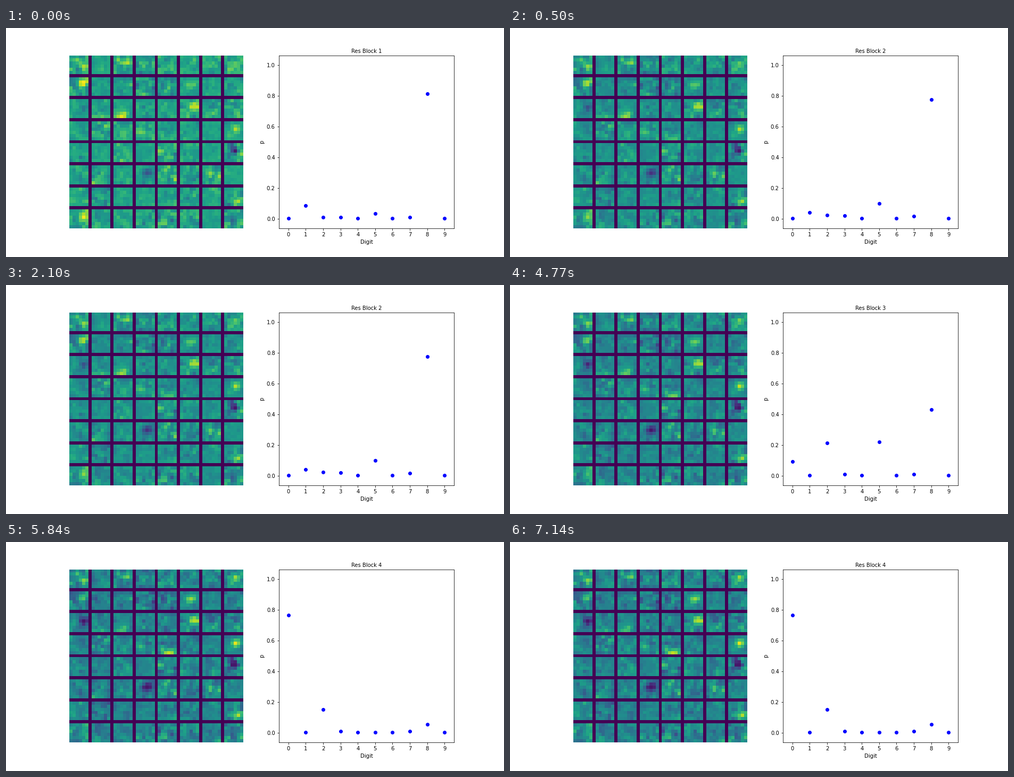
A matplotlib script for the animation above (8000 ms loop, 936 by 432 pixels).

```python
import matplotlib.pyplot as plt
import numpy as np
from matplotlib.animation import FuncAnimation

TILES, SIZE = 8, 6
STEP = SIZE + 1
SIDE = TILES * STEP - 1
INTERVAL, LOOP = 40, 8000
SWITCHES = (500, 3170, 5840)
BLOCKS = len(SWITCHES) + 1

# Digits that stand out in each block; the others stay near zero
PEAKS = (
    {1: .086, 2: .010, 5: .034, 8: .814},
    {1: .041, 2: .024, 3: .020, 5: .100, 7: .017, 8: .776},
    {0: .093, 2: .214, 5: .220, 8: .431},
    {0: .765, 2: .152, 8: .055},
)

# Strongest features: row, column, strength in the first and last block
SPOTS = (
    (3, 4, .28, .33), (2, 52, .22, .40), (8, 4, .33, .10), (9, 38, .20, .38),
    (16, 4, -.12, -.40), (19, 16, .42, .27), (16, 39, .36, .46),
    (26, 31, .02, .45), (23, 52, .28, .46), (30, 52, -.32, -.42),
    (37, 24, -.35, -.42), (46, 53, .22, .38), (51, 4, .36, .05),
)


def noise_tile(rng):
    """Partly smoothed noise around a random tile mean."""
    n = rng.normal(size=(SIZE + 1, SIZE + 1))
    smooth = (n[1:, 1:] + n[:-1, 1:] + n[1:, :-1] + n[:-1, :-1]) / 2
    tile = 0.85 * smooth + 0.4 * rng.normal(size=(SIZE, SIZE))
    return rng.uniform(0.03, 0.11) * tile + rng.normal(0, 0.015)


def noise_map(rng):
    grid = np.zeros((SIDE, SIDE))
    for r in range(0, SIDE, STEP):
        for c in range(0, SIDE, STEP):
            grid[r:r + SIZE, c:c + SIZE] = noise_tile(rng)
    return grid


def spot_map(share):
    rows, cols = np.mgrid[:SIDE, :SIDE]
    grid = np.zeros((SIDE, SIDE))
    for r, c, first, last in SPOTS:
        same_tile = (rows // STEP == r // STEP) & (cols // STEP == c // STEP)
        blob = np.exp(-(rows - r) ** 2 / 1.6 - (cols - c) ** 2 / 2.4)
        grid += (first + share * (last - first)) * blob * same_tile
    return grid


def feature_maps():
    rng = np.random.default_rng(8)
    base, drift = noise_map(rng), noise_map(rng)
    line = np.arange(SIDE) % STEP == SIZE
    gaps = line[:, None] | line[None, :]
    maps = []
    for share in np.linspace(0, 1, BLOCKS):
        level = 0.465 + 0.12 * (1 - share) ** 2
        grid = level + base + 0.5 * share * drift + spot_map(share)
        maps.append(np.where(gaps, 0, np.clip(grid, 0.06, 1)))
    return maps


def probabilities(peaks):
    p = np.where(digits % 4 == 3, 0.010, 0.002)
    p[list(peaks)] = list(peaks.values())
    return p


plt.rcParams.update({"font.family": "DejaVu Sans", "font.size": 10})
fig, (left, right) = plt.subplots(1, 2, figsize=(13, 6), dpi=72)
fig.subplots_adjust(left=0.125, right=0.9, bottom=0.125, top=0.88, wspace=0.2)

digits = np.arange(10)
maps = feature_maps()
probs = [probabilities(peaks) for peaks in PEAKS]

image = left.imshow(maps[0], cmap="viridis", vmin=0, vmax=1,
                    interpolation="nearest")
left.axis("off")

dots = right.scatter(digits, probs[0], color="b")
right.set_xlim(-0.555, 9.555)
right.set_ylim(-0.0621, 1.0626)
right.set_xticks(digits)
right.set_yticks(np.arange(0, 1.1, 0.2))
right.set_xlabel("Digit")
right.set_ylabel("p")
title = right.set_title("Res Block 1", fontsize=10, pad=5)


def update(i):
    end = (i + 1) * INTERVAL
    block = sum(end > t for t in SWITCHES)
    image.set_data(maps[block])
    dots.set_offsets(np.column_stack((digits, probs[block])))
    title.set_text(f"Res Block {block + 1}")
    return image, dots, title


anim = FuncAnimation(fig, update, frames=LOOP // INTERVAL, interval=INTERVAL,
                     repeat=True, repeat_delay=0)
plt.show()
```
